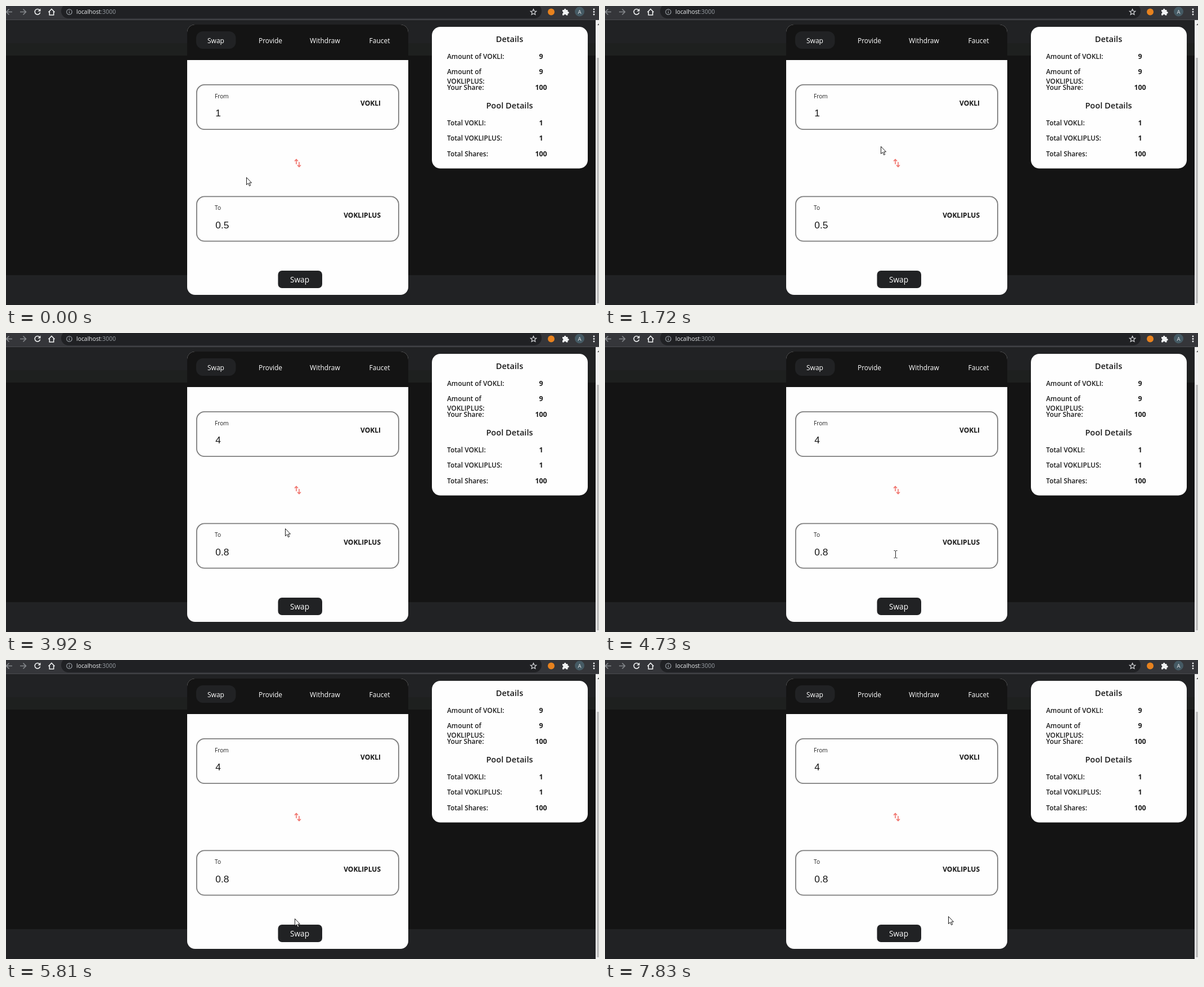
These frames come from a looping animation (1054 by 531 pixels, 8 s). An HTML page:

```html
<!DOCTYPE html>
<html lang="en">
<head>
<meta charset="utf-8">
<title>Swap</title>
<style>
  html, body { margin: 0; height: 100%; overflow: hidden; background: #141414; }
  svg { display: block; width: 1054px; height: 531px; font: 12px "Open Sans", "Noto Sans", sans-serif; }
  .mid { text-anchor: middle; }
  .end { text-anchor: end; }
  .bold { font-weight: 700; }
  .semi { font-weight: 600; }
  .input { font: 17.33px "Liberation Sans", Arial, sans-serif; }
  .line { fill: none; stroke-width: 1.6; }
  .cursor { fill: #fff; stroke: #000; stroke-width: .9; stroke-linejoin: round; }
</style>
</head>
<body>
<svg viewBox="0 0 1054 531">
  <!-- page background -->
  <rect width="1054" height="531" fill="#141414"/>
  <rect y="24" width="1054" height="42" fill="#212224"/>
  <rect y="66" width="1054" height="22" fill="#1e201f"/>
  <rect y="478" width="1054" height="53" fill="#212224"/>

  <!-- browser bar -->
  <rect width="1054" height="24" fill="#35363a"/>
  <rect y="24" width="1054" height="1" fill="#4a4b4f"/>
  <rect x="98" y="-4" width="854" height="26" rx="13" fill="#202124"/>
  <g class="line" stroke="#85888c">
    <path d="M11 10.5H1M5.500 5.500L.5 10.500 5.500 15.500M25 10.500H35M30.500 5.500L35.500 10.500 30.500 15.500"/>
  </g>
  <g class="line" stroke="#f1f3f4">
    <path d="M60 7.500A4.800 4.800 0 1 0 60.700 11.500"/>
    <path d="M75.500 11L81 5.500 86.500 11M77.300 10V16H84.700V10"/>
  </g>
  <path d="M61.500 4.500V9.500H56.500Z" fill="#f1f3f4"/>
  <g class="line" stroke="#9aa0a6" style="stroke-width:1.2">
    <circle cx="112.500" cy="10.500" r="4.700"/>
    <path d="M112.500 9.800V13M112.500 7.700V8.800"/>
    <path d="M937.500 5.500L939 9 942.700 9.300 939.900 11.700 940.800 15.300 937.500 13.400 934.200 15.300 935.100 11.700 932.300 9.300 936 9Z" stroke="#d5d7da"/>
  </g>
  <text x="125" y="14" font-size="10.4" fill="#eceef0">localhost<tspan fill="#9aa0a6">:3000</tspan></text>
  <circle cx="969" cy="10.500" r="6" fill="#e8821e"/>
  <path d="M989 7H992V6.500A1.700 1.700 0 0 1 995.400 6.500V7H998.500V10H999A1.700 1.700 0 0 1 999 13.400H998.500V16.500H995.500A1.800 1.800 0 0 0 991.900 16.500H989V13.300A1.800 1.800 0 0 0 989 9.800Z" fill="#f1f3f4"/>
  <circle cx="1019.500" cy="10" r="8.500" fill="#455a64"/>
  <text class="mid" x="1019.500" y="13.500" font-size="9.500" fill="#e8eaed">A</text>
  <g fill="#f1f3f4">
    <circle cx="1045" cy="6" r="1.400"/><circle cx="1045" cy="10.500" r="1.400"/><circle cx="1045" cy="15" r="1.400"/>
  </g>

  <!-- scrollbar -->
  <rect x="1048" y="25" width="6" height="506" fill="#f1f1f1"/>
  <rect x="1050" y="92" width="4" height="436" fill="#c1c1c1"/>
  <path d="M1051 34L1054 31V34Z" fill="#505050"/>

  <!-- swap card -->
  <rect x="322" y="33" width="393" height="480" rx="14" fill="#fefefe"/>
  <path d="M322 96V47A14 14 0 0 1 336 33H701A14 14 0 0 1 715 47V96Z" fill="#141414"/>
  <rect x="338" y="45" width="70.500" height="31" rx="12" fill="#212224"/>
  <g id="tabs" fill="#fff"></g>
  <g fill="none" stroke="#7d7d7d" stroke-width="1.800">
    <rect x="338.900" y="139.900" width="359" height="79.300" rx="14"/>
    <rect x="338.900" y="338.400" width="359" height="79.300" rx="14"/>
  </g>
  <g font-size="10.2" fill="#222">
    <text x="371" y="163.500">From</text>
    <text x="371" y="362">To</text>
  </g>
  <g class="end bold" fill="#141414">
    <text x="666" y="177">VOKLI</text>
    <text x="666" y="375.500">VOKLIPLUS</text>
  </g>
  <text id="from" class="input" x="372.300" y="196"></text>
  <text id="to" class="input" x="372.300" y="394.500" fill="#141414"></text>
  <rect id="caret" y="180" width="1" height="20" fill="#000"/>
  <path class="line" stroke="#f0736c" stroke-width="1.500" d="M516 281V273M513 275.500L516 272.500 519 275.500M521 277V285M518 282.500L521 285.500 524 282.500"/>
  <rect x="483.500" y="470" width="78.500" height="31" rx="7" fill="#212224"/>
  <text class="mid" x="522" y="491" font-size="13.700" fill="#fff">Swap</text>

  <!-- details card -->
  <rect x="757" y="37" width="277" height="251.500" rx="15" fill="#fefefe"/>
  <g id="details" fill="#1a1a1a"></g>

  <!-- pointers, hot spot at 0,0 -->
  <path id="arrow" class="cursor" d="M.5 .5V13.500L3.500 10.700 5.600 15.500 7.700 14.600 5.600 10H9.500Z"/>
  <path id="hand" class="cursor" d="M-.9 9.500V1.600A1.300 1.300 0 0 1 1.700 1.600V6Q3 5.200 3.900 6.400 5.100 5.700 6 7 7.500 6.500 7.600 8.300V12Q7.500 14 6.400 15V17H-.2V15.500L-4.300 10.200Q-4.600 8.500-2.900 8.600Z"/>
  <path id="beam" fill="none" stroke="#222" d="M-3 -6.500H-1.200L0 -5.700 1.200 -6.500H3M-3 6.500H-1.200L0 5.700 1.200 6.500H3M0 -6V6"/>
</svg>
<script>
const $ = id => document.getElementById(id);

function addText(parent, text, x, y, size, className) {
  const node = document.createElementNS("http://www.w3.org/2000/svg", "text");
  node.textContent = text;
  for (const [key, value] of Object.entries({ x, y, "font-size": size, class: className }))
    node.setAttribute(key, value);
  $(parent).append(node);
}

["Swap", "Provide", "Withdraw", "Faucet"].forEach((name, i) =>
  addText("tabs", name, 373 + i * 97, 66, 12, "mid"));

addText("details", "Details", 895, 63.5, 14.6, "mid semi");
addText("details", "Pool Details", 895, 181.5, 14.6, "mid semi");
addText("details", "VOKLIPLUS:", 784, 137.5, 11.9, "semi");
[["Amount of VOKLI:", 9, 93.5], ["Amount of", 9, 121], ["Your Share:", 100, 148.5],
 ["Total VOKLI:", 1, 211.5], ["Total VOKLIPLUS:", 1, 239], ["Total Shares:", 100, 266.5]]
  .forEach(([label, value, y]) => {
    addText("details", label, 784, y, 11.9, "semi");
    addText("details", value, 951, y, 12.3, "mid bold");
  });

// [time, x, y, pointer]
const moves = [
  [0, 427, 304, "arrow"], [120, 457, 370, "arrow"], [250, 490, 443, "arrow"],
  [400, 531, 485, "hand"], [520, 529, 455, "arrow"], [640, 521, 399, "arrow"],
  [790, 499, 310, "arrow"], [910, 490, 249, "arrow"], [3800, 493, 292, "arrow"],
  [3920, 496, 347, "arrow"], [4070, 496, 362, "arrow"], [4220, 498, 380, "beam"],
  [4340, 500, 386, "beam"], [4460, 503, 390, "beam"], [4580, 505, 392.5, "beam"],
  [4730, 516.5, 393, "beam"], [4880, 537, 411, "arrow"], [5000, 526, 424, "arrow"],
  [5120, 503, 429, "arrow"], [5270, 468, 427, "arrow"], [5420, 439, 412, "arrow"],
  [5540, 475, 425, "arrow"], [5660, 508, 435, "arrow"], [5810, 513, 459, "arrow"],
  [5960, 524, 482, "hand"], [6110, 526, 484.5, "hand"], [7160, 572, 470, "arrow"],
  [7280, 607, 459, "arrow"], [7710, 608, 457, "arrow"], [7830, 610, 455, "arrow"]
];
const caretOn = [[120, 640], [1190, 1720], [2140, 2730], [3130, 3650],
                 [4070, 4580], [5120, 5660], [6110, 6630]];

function draw(now) {
  const t = now % 8000;
  const [, x, y, pointer] = moves.findLast(move => move[0] <= t);
  for (const id of ["arrow", "hand", "beam"])
    $(id).setAttribute("visibility", id === pointer ? "visible" : "hidden");
  $(pointer).setAttribute("transform", `translate(${x} ${y})`);

  const empty = t >= 1990 && t < 3130;
  $("from").textContent = empty ? "Enter amount" : t < 1990 ? "1" : "4";
  $("from").setAttribute("fill", empty ? "#757575" : "#141414");
  $("to").textContent = t < 3390 ? "0.5" : "0.8";
  $("caret").setAttribute("x", empty ? 372 : 382);
  $("caret").setAttribute("visibility",
    caretOn.some(([from, to]) => t >= from && t < to) ? "visible" : "hidden");
  requestAnimationFrame(draw);
}
draw(0);
</script>
</body>
</html>
```
